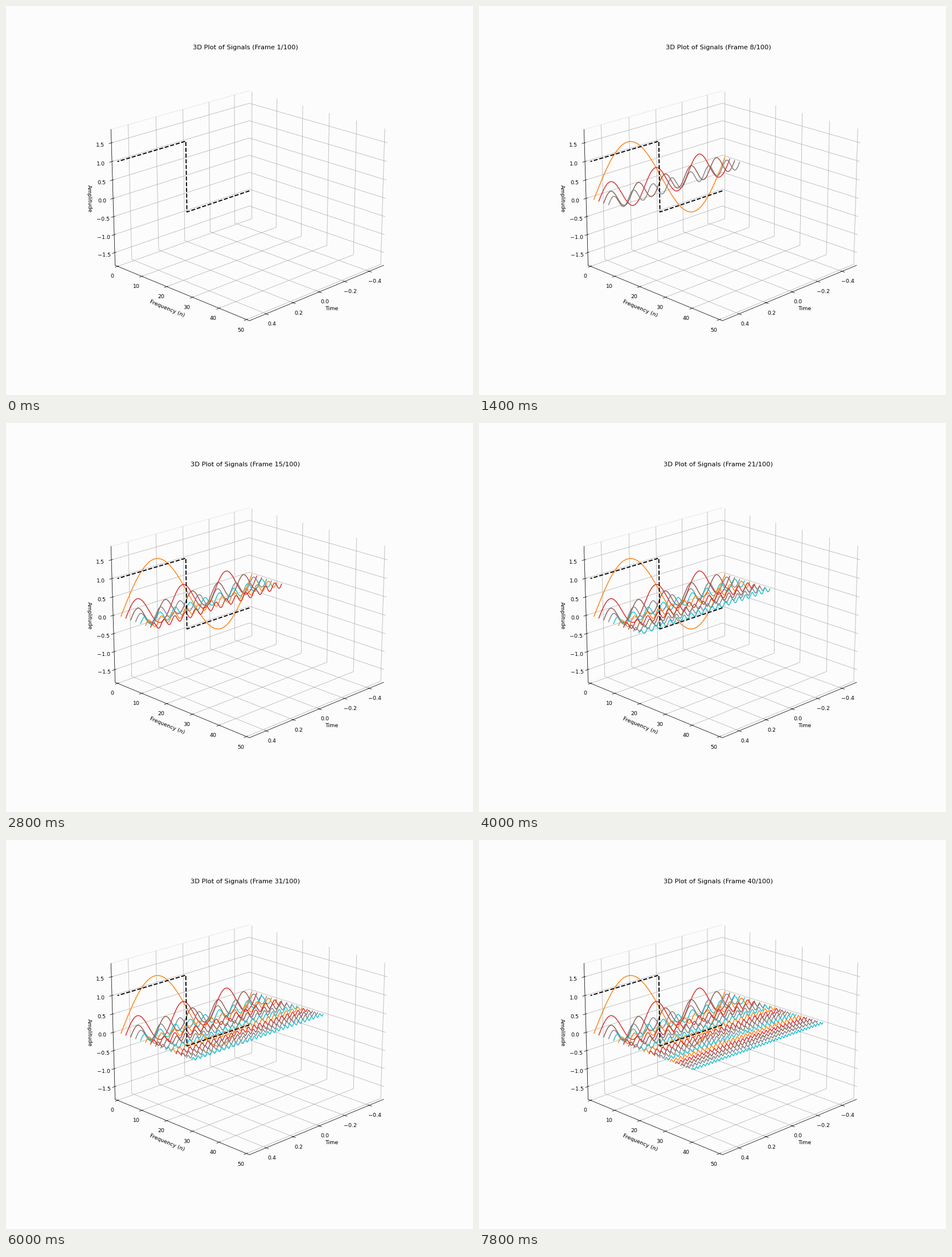
Recreate the animation shown at these times as a matplotlib script. Size 820x683 px, loop 8000 ms.

```python
import numpy as np
import matplotlib.pyplot as plt
from matplotlib.animation import FuncAnimation

WIDTH, HEIGHT = 820, 683
DPI = WIDTH / 12
FRAMES, INTERVAL = 40, 200
PAPER = "#fcfcfc"


def padded(low, high):
    """Widen a range by 1/48 on each side."""
    pad = (high - low) / 48
    return low - pad, high + pad


def harmonic(n):
    return 4 / (np.pi * n) * np.sin(2 * np.pi * n * time)


fig = plt.figure(figsize=(12, (HEIGHT + 0.001) / DPI), dpi=DPI, facecolor=PAPER)
ax = fig.add_subplot(projection="3d", facecolor=PAPER)
ax.view_init(elev=20, azim=45)

peak = 1.4 * 4 / np.pi
ax.set_xlim(*padded(-0.5, 0.5))
ax.set_ylim(*padded(0, 50))
ax.set_zlim(*padded(-peak, peak))
ax.set_xlabel("Time")
ax.set_ylabel("Frequency (n)")
ax.set_zlabel("Amplitude")
title = ax.set_title("")

for axis, edge in ((ax.xaxis, PAPER), (ax.yaxis, "#e6e6e6"), (ax.zaxis, PAPER)):
    axis.pane.set_alpha(1)
    axis.pane.set_facecolor(PAPER)
    axis.pane.set_edgecolor(edge)

time = np.linspace(-0.5, 0.5, 1000)
waves = {}
for n in range(1, FRAMES, 2):
    waves[n], = ax.plot(time, np.full_like(time, n), harmonic(n), color=f"C{n % 10}")
ax.plot(time, np.zeros_like(time), np.sign(time), "k--", lw=2)


def update(i):
    title.set_text(f"3D Plot of Signals (Frame {i + 1}/100)")
    for n, wave in waves.items():
        wave.set_visible(n <= i)
    return [title, *waves.values()]


anim = FuncAnimation(fig, update, frames=FRAMES, interval=INTERVAL,
                     init_func=lambda: update(0), repeat=True, repeat_delay=0)
plt.show()
```
